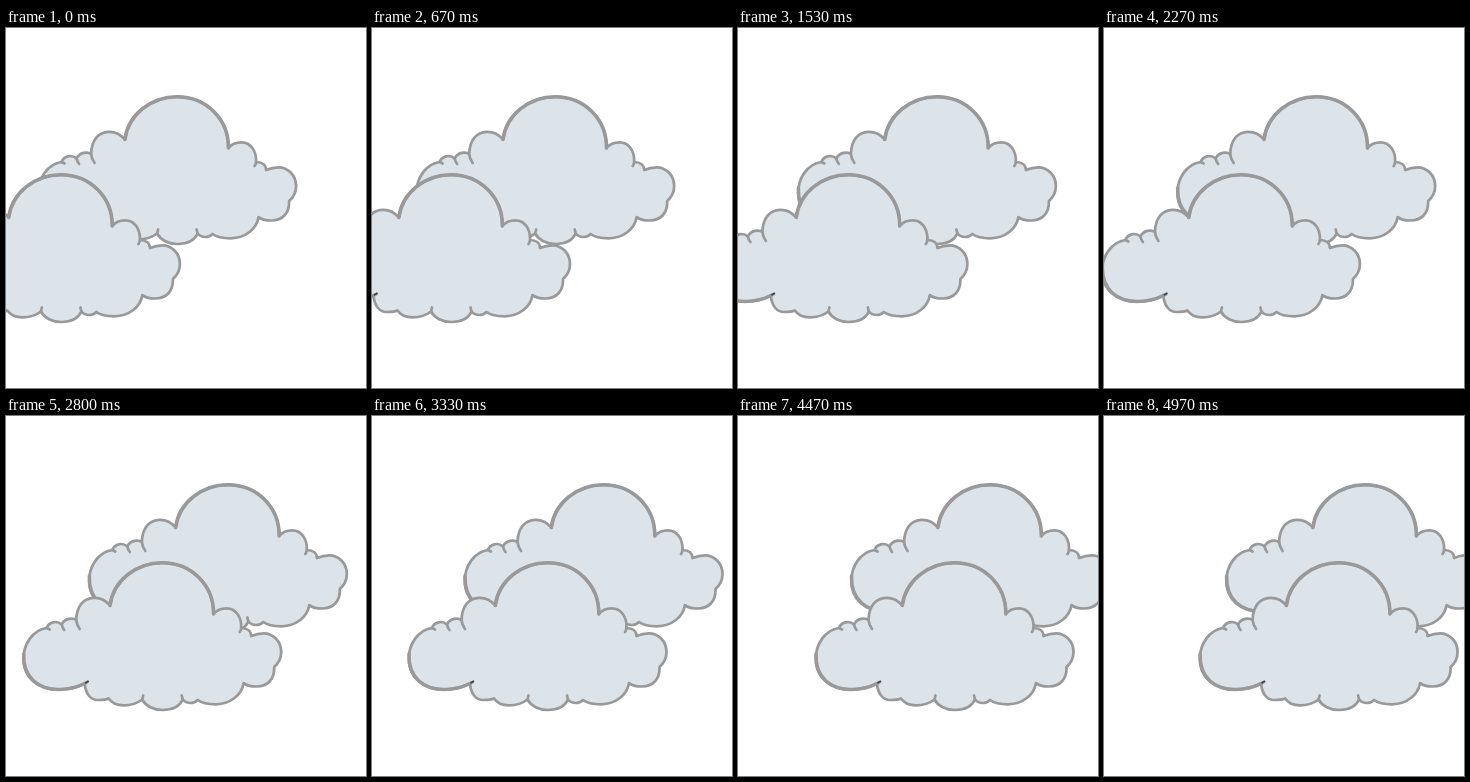
Write an HTML page that moves like this. It is 360 by 360 pixels and loops after 5.01 s.

```html
<!DOCTYPE html>
<html lang="en">
<head>
<meta charset="utf-8">
<title>Drifting clouds</title>
<style>
  html, body { margin: 0; width: 100%; height: 100%; overflow: hidden; background: #fff; }
  svg { display: block; width: 100vw; height: 100vh; }
  .line { fill: none; stroke: #999; stroke-width: 2.7; stroke-linecap: round; stroke-linejoin: round; }
  .body { fill: #dce4ea; }
  .bold { stroke-width: 3.6; }
  .tick { stroke: #444; stroke-width: 1.6; }
</style>
</head>
<body>
<svg viewBox="0 0 360 360">
  <defs>
    <g id="cloud">
      <path class="line body" d="M60 212 C46 214 36.8 228 36.8 243 C36.8 262 52 273.5 72 273.5
        C84 273.5 94 270 101 266 L98 268 C99 278 104 284 111 284 C115 284 119 284 122 282.5
        C125 287 130 289.3 137 289.3 C145 289.3 151 287 155.5 283.5 C159 290 167 294 176 294
        C186 294 193 290 196 283.5 C198 286 201 287 204 287 C207 287 209 286 211 284
        C215 287 222 288.3 229 288.3 C244 288 255 279 257 267 C260 270 265 270.5 270 270.5
        C281 270.5 288 263 287.5 251 C292 247 294.5 242 294.5 236
        C294.5 225 286 217.3 277 217.3 C272 217.3 268 218.5 264.5 220
        C264.5 215.5 261 212 254.5 212 C255 201 249 192.3 240 192.3
        C235 192.3 230 194 226.8 198 C227.2 169 204.5 146.8 175.5 146.8
        C149 146.8 126.5 165 123.3 189.5 C118 183 112 181.6 107 181.8
        C97 182 90 190 89.5 204 C86 201.5 78 202 75 208.5
        C70 204 62 206 60 212 Z"/>
      <path class="line bold" d="M226.8 198 C227.2 169 204.5 146.8 175.5 146.8
        C149 146.8 126.5 165 123.3 189.5
        M37 238 C36 262 52 273.5 72 273.5 C83 273.5 93 270 98 267.5"/>
      <path class="line" d="M89.5 204 q.5 5 3.5 9 M75 208.5 q.5 3 2.5 5.5 M60 212 l3 1.5
        M254.5 212 q-.5 3 -1.5 4 M155.5 283.5 l1 -4 M196 283.5 l-1 -4"/>
      <path class="line tick" d="M99 266.8 l2.5 -1.5"/>
    </g>
  </defs>
  <use id="back" href="#cloud"/>
  <use id="front" href="#cloud"/>
</svg>
<script>
  const LOOP = 5010, LAST = 149, MID = 100;
  const clouds = [
    { id: 'back', x: 56, y: -78, speed: 0.604 },
    { id: 'front', x: 0, y: 0, speed: 1.206 }
  ].map(c => ({ ...c, el: document.getElementById(c.id) }));

  // 30 steps per second, with each change rounded to 10 ms
  const stepAt = ms => Math.min(LAST, Math.floor(0.3 * Math.floor(ms / 10) + 0.15));

  function draw(ms) {
    const step = stepAt(ms % LOOP);
    for (const c of clouds) {
      const x = c.x + c.speed * (step - MID);
      c.el.setAttribute('transform', `translate(${x.toFixed(2)} ${c.y})`);
    }
  }

  const start = performance.now();
  function tick() {
    draw(performance.now() - start);
    requestAnimationFrame(tick);
  }
  tick();
</script>
</body>
</html>
```
